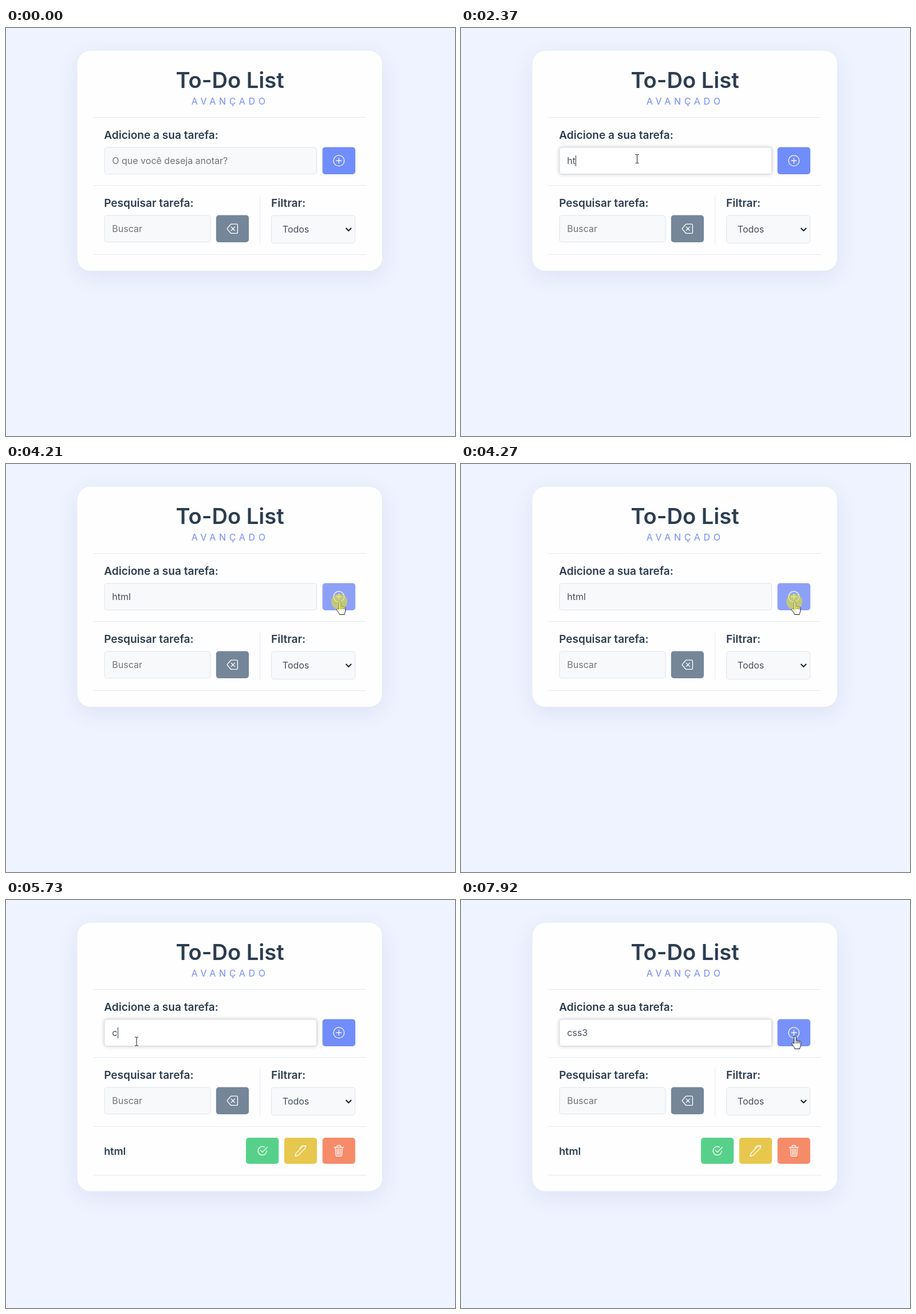
An HTML page with a canvas that plays this animation: 784x714 px, repeating every 7.99 s.

```html
<!DOCTYPE html>
<html lang="pt">
<head>
<meta charset="utf-8">
<title>To-Do List</title>
<style>
html, body { margin: 0; width: 100%; height: 100%; overflow: hidden; background: #eff3ff; }
canvas { display: block; }
</style>
</head>
<body>
<canvas id="stage" width="784" height="714"></canvas>
<script>
const ctx = document.getElementById('stage').getContext('2d');
const LOOP = 7990;
const INK = '#2c3e50', BODY = '#454f5b', HINT = '#757575', RULE = '#e0e8f1';

const FIELD = [171.5, 208.5, 371.5, 47.5];
const SEARCH = [171.5, 327.5, 186, 47.5];
const SELECT = [463, 327.5, 147, 49.5];
const ADD = [552.5, 208.5, 57.5, 47.5];
const CLEAR = [366.8, 327.5, 57.2, 47.5];

const ICONS = {
  plus: 'M15.5 8a7.5 7.5 0 1 1-15 0a7.5 7.5 0 0 1 15 0zM4.5 8h7M8 4.5v7',
  erase: 'M13.7 1.5a1.5 1.5 0 0 1 1.5 1.5v10a1.5 1.5 0 0 1-1.5 1.5H6.6a1.5 1.5 0 0 1-1.14-.52L.62 8.33a.5.5 0 0 1 0-.65L5.46 2.02A1.5 1.5 0 0 1 6.6 1.5zM6.2 5.5l5 5m0-5l-5 5',
  check: 'M14 8A6 6 0 1 1 11 2.8M5 7l3 3 7-7',
  pen: 'M.5 15.5l1-4L11.8 1.2a1 1 0 0 1 1.4 0l1.6 1.6a1 1 0 0 1 0 1.4L4.5 14.5zM6.5 4.5L9.8 1.2a1 1 0 0 1 1.4 0M13.8 1.2l.3-.3a.7.7 0 0 1 1 1l-.3.3',
  trash: 'M5.5 2.5v-1a1 1 0 0 1 1-1h3a1 1 0 0 1 1 1v1M1.5 3h13M3 3l.85 11.1a1.5 1.5 0 0 0 1.5 1.4h5.3a1.5 1.5 0 0 0 1.5-1.4L13 3M5.5 5l.5 8.5M8 5v8.5M10.5 5l-.5 8.5'
};
const ARROW = new Path2D('M0 0V16.2L3.7 12.8 6.2 18.4 8.6 17.4 6.1 11.8H11.2z');
const HAND = new Path2D('M-1.8 1.4a1.7 1.7 0 0 1 3.4 0V7.8a1.5 1.5 0 0 1 2.8.6a1.5 1.5 0 0 1 2.7.6a1.5 1.5 0 0 1 2.6 1.2V15c0 3-1.7 4-1.7 7H-.6c-.6-3-3-5-5-8.2a1.6 1.6 0 0 1 2.4-2L-1.8 13z');
const KNUCKLES = new Path2D('M1.6 8v4.5M4.4 8.6v4M7.1 9.2v3.6');
const BEAM = new Path2D('M-3 -7.5h2.3l.7.7.7-.7H3M0 -7V7M-3 7.5h2.3l.7-.7.7.7H3');

// start, end, steps, then start, control and end points
const MOVES = [
  [500, 1110, 9, 718, 673, 512, 451, 307.5, 229],
  [3670, 4140, 7, 440, 264, 525, 272, 583, 241.5],
  [4403, 4869, 7, 583, 241.5, 430, 340, 228, 247.5],
  [7508, 7918, 5, 228, 247.5, 400, 165, 583.5, 238.5]
];
const TYPED = [[0, ''], [2100, 'h'], [2370, 'ht'], [2570, 'htm'], [2840, 'html'], [4340, ''],
  [5730, 'c'], [6010, 'cs'], [6200, 'css'], [6930, 'css3']];
const CARET = [[1140, 1640], [2100, 3340], [3840, 4140], [4340, 4840], [5340, 6730], [6930, 7450]];
const CLICKS = [[1110, 1200], [4190, 4330]];

const clamp = v => Math.max(0, Math.min(1, v));
const ramp = (t, from, span) => clamp((t - from) / span);
const latest = (list, t) => list.filter(e => t >= e[0]).pop();
const during = (list, t) => list.some(([a, b]) => t >= a && t < b);
const inside = (x, y, [l, t, w, h]) => x >= l && x <= l + w && y >= t && y <= t + h;
const mix = (a, b, u) => `rgb(${a.map((v, i) => Math.round(v + (b[i] - v) * u))})`;

function text(str, x, y, size, color, weight = 400) {
  ctx.font = `${weight} ${size}px Inter, sans-serif`;
  ctx.fillStyle = color;
  ctx.fillText(str, x, y);
}

function box([x, y, w, h], radius, fill, border) {
  ctx.beginPath();
  ctx.roundRect(x, y, w, h, radius);
  ctx.fillStyle = fill;
  ctx.fill();
  if (!border) return;
  ctx.shadowColor = 'transparent';
  ctx.beginPath();
  ctx.roundRect(x + .5, y + .5, w - 1, h - 1, radius - .5);
  ctx.strokeStyle = border;
  ctx.lineWidth = 1;
  ctx.stroke();
}

function shadowed(color, blur, dy, draw) {
  ctx.save();
  ctx.shadowColor = color;
  ctx.shadowBlur = blur;
  ctx.shadowOffsetY = dy;
  draw();
  ctx.restore();
}

function button(rect, color, icon) {
  box(rect, 5, color);
  ctx.save();
  ctx.translate(rect[0] + rect[2] / 2 - 10, rect[1] + rect[3] / 2 - 10);
  ctx.scale(1.25, 1.25);
  ctx.strokeStyle = '#fff';
  ctx.lineWidth = 1.05;
  ctx.lineCap = ctx.lineJoin = 'round';
  ctx.stroke(new Path2D(ICONS[icon]));
  ctx.restore();
}

function rule(x, y, w, h) {
  ctx.fillStyle = RULE;
  ctx.fillRect(x, y, w, h);
}

function addField(t) {
  const focus = ramp(t, 1130, 100) * (1 - ramp(t, 4130, 70)) + ramp(t, 4340, 120);
  shadowed(`rgba(0,0,0,${.22 * focus})`, 6, 0, () =>
    box(FIELD, 5, mix([248, 249, 251], [255, 255, 255], focus), mix([223, 227, 232], [212, 217, 222], focus)));
  const value = latest(TYPED, t)[1];
  text(value || 'O que você deseja anotar?', 185.3, 238, 16, value ? BODY : HINT);
  if (during(CARET, t)) {
    ctx.fillStyle = '#333b44';
    ctx.fillRect(Math.floor(185.9 + (value ? ctx.measureText(value).width : 0)), 223, 1, 19);
  }
}

function card(t) {
  const hasTask = t >= 4340;
  shadowed('rgba(50,70,130,.09)', 36, 10, () =>
    box([123.5, 38.5, 534.5, hasTask ? 472 : 387.5], 24, '#fefeff', '#dfe7f5'));

  ctx.textAlign = 'center';
  text('To-Do List', 391, 105, 38.1, INK, 600);
  ctx.textAlign = 'left';
  ctx.letterSpacing = '5.72px';
  text('AVANÇADO', 323.8, 133.7, 16, '#738cf5');
  ctx.letterSpacing = '0px';
  [156, 275, 396].forEach(y => rule(152, y, 477, 1));
  rule(443, 295, 1, 82);

  text('Adicione a sua tarefa:', 171.2, 194.3, 19.06, INK, 600);
  addField(t);
  const hover = ramp(t, 3980, 220) * (1 - ramp(t, 4470, 280)) + .25 * ramp(t, 7850, 60);
  button(ADD, mix([113, 141, 251], [141, 160, 247], hover), 'plus');

  text('Pesquisar tarefa:', 171.2, 313.3, 19.06, INK, 600);
  box(SEARCH, 5, '#f8f9fb', '#dfe3e8');
  text('Buscar', 185.3, 357, 16, HINT);
  button(CLEAR, '#758699', 'erase');

  text('Filtrar:', 463, 313.3, 19.06, INK, 600);
  box(SELECT, 5, '#f8f9fb', '#dfe3e8');
  text('Todos', 482.8, 358, 16, BODY);
  ctx.strokeStyle = '#20262d';
  ctx.lineWidth = 2;
  ctx.stroke(new Path2D('M593.4 350l4.8 4.8 4.8-4.8'));

  if (hasTask) {
    text('html', 171.2, 445.5, 17.84, INK, 600);
    button([419, 416, 57.2, 45.8], '#57d18a', 'check');
    button([485.8, 416, 57.2, 45.8], '#e8c74e', 'pen');
    button([552.6, 416, 57.2, 45.8], '#f68b6a', 'trash');
    rule(152, 481, 477, 1);
  }
}

function pointerAt(t) {
  const move = latest(MOVES, t);
  if (!move) return null;
  const [start, end, steps, x0, y0, cx, cy, x1, y1] = move;
  const u = Math.floor(ramp(t, start, end - start) * steps + 1e-6) / steps;
  const e = 1 - (1 - u) ** 1.7;
  const bezier = (a, c, b) => (1 - e) ** 2 * a + 2 * e * (1 - e) * c + e * e * b;
  return [bezier(x0, cx, x1), bezier(y0, cy, y1)];
}

function pointer(t) {
  const at = pointerAt(t);
  if (!at) return;
  const over = rect => inside(...at, rect);
  ctx.save();
  ctx.translate(...at);
  ctx.strokeStyle = '#15181c';
  ctx.fillStyle = '#fff';
  ctx.lineWidth = 1;
  ctx.lineJoin = 'round';
  if (over(FIELD) || over(SEARCH)) {
    ctx.stroke(BEAM);
  } else if (over(ADD) || over(CLEAR)) {
    ctx.fill(HAND);
    ctx.stroke(HAND);
    ctx.stroke(KNUCKLES);
  } else {
    ctx.fill(ARROW);
    ctx.stroke(ARROW);
  }
  if (during(CLICKS, t)) {
    ctx.beginPath();
    ctx.arc(-1, -.5, 14, 0, 7);
    ctx.fillStyle = 'rgba(225,225,50,.6)';
    ctx.fill();
  }
  ctx.restore();
}

function draw(now) {
  const t = now % LOOP;
  ctx.fillStyle = '#eff3ff';
  ctx.fillRect(0, 0, 784, 714);
  card(t);
  pointer(t);
}

let origin;
function tick(now) {
  origin ??= now;
  draw(now - origin);
  requestAnimationFrame(tick);
}
draw(0);
requestAnimationFrame(tick);
</script>
</body>
</html>
```
